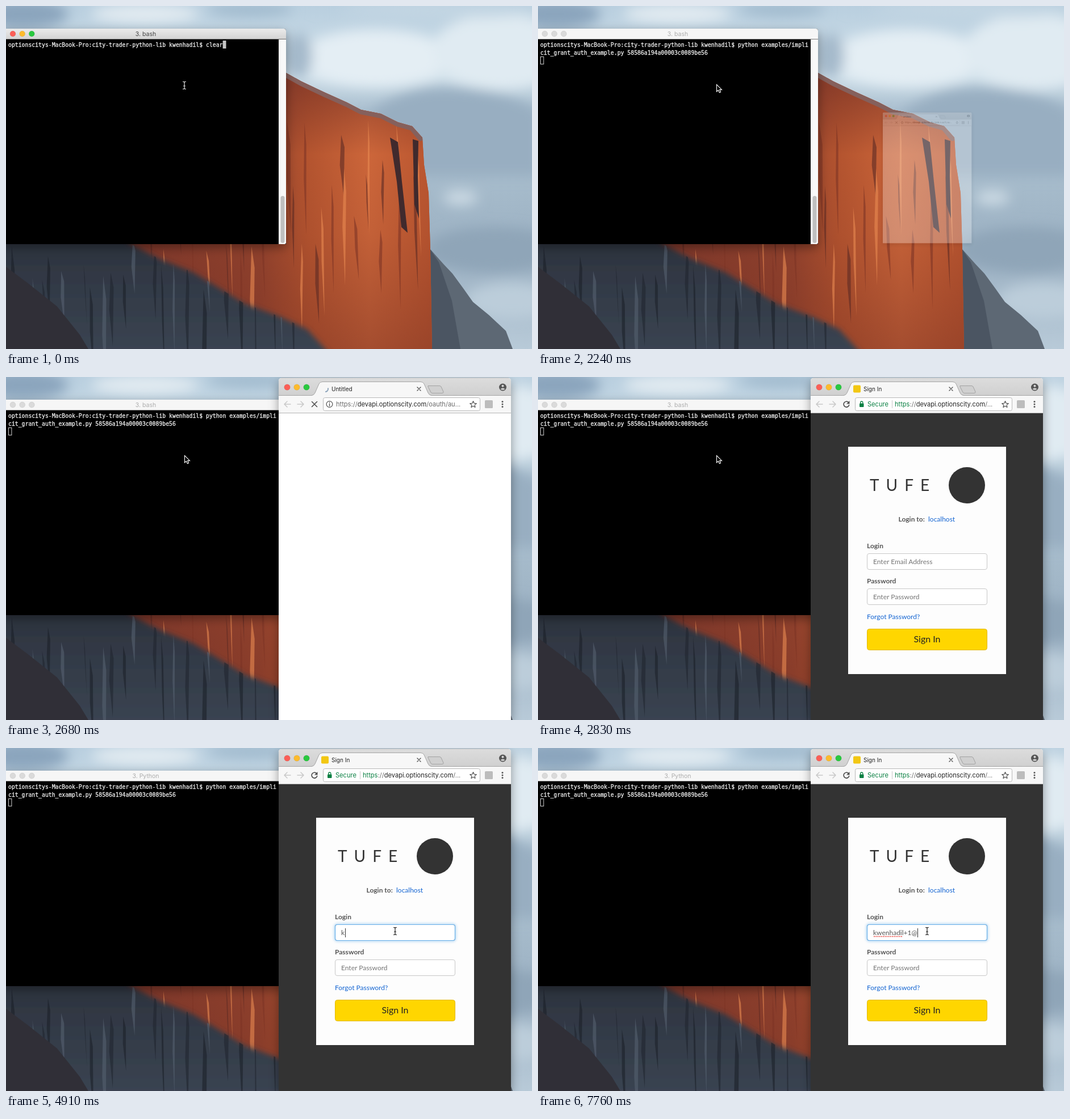
Animation, 926 px wide and 605 px high, one loop 8 s. Source, as an HTML page:

```html
<!DOCTYPE html>
<html lang="en">
<head>
<meta charset="utf-8">
<title>Terminal sign in</title>
<style>
  html, body { margin: 0; width: 100%; height: 100%; overflow: hidden; background: #b4c6d6; }
  svg { display: block; width: 926px; height: 605px; }
  text { white-space: pre; }
  .mono { font: 9.8px "DejaVu Sans Mono", monospace; fill: #ececec; stroke: #ececec; stroke-width: .32px; }
  .ui { font: 11.1px Inter, sans-serif; fill: #6b6b6b; }
  .page { font: 12px Lato, sans-serif; fill: #555; }
  .bold { font-weight: 700; }
  .link { fill: #1465d2; }
  .hint { fill: #757575; }
  .line { fill: none; stroke-linecap: round; stroke-linejoin: round; }
  #beam { mix-blend-mode: difference; }
</style>
</head>
<body>
<svg viewBox="0 0 926 605">
  <defs>
    <linearGradient id="sky" x2="0" y2="1">
      <stop offset="0" stop-color="#b9cfdf"/>
      <stop offset=".2" stop-color="#d0e0ea"/>
      <stop offset=".3" stop-color="#abc0d0"/>
      <stop offset=".52" stop-color="#a6bbcb"/>
      <stop offset=".72" stop-color="#9bb0c2"/>
      <stop offset="1" stop-color="#b8cad8"/>
    </linearGradient>
    <linearGradient id="sun">
      <stop offset="0" stop-color="#7c372b"/>
      <stop offset=".45" stop-color="#93432e"/>
      <stop offset=".6" stop-color="#b4542f"/>
      <stop offset=".8" stop-color="#cc663a"/>
      <stop offset="1" stop-color="#b9552f"/>
    </linearGradient>
    <linearGradient id="dusk" x2="0" y2="1">
      <stop offset=".08" stop-color="#6e2d25" stop-opacity=".55"/>
      <stop offset=".32" stop-color="#6e2d25" stop-opacity="0"/>
      <stop offset=".6" stop-color="#742f22" stop-opacity=".1"/>
      <stop offset="1" stop-color="#742f22" stop-opacity=".45"/>
    </linearGradient>
    <linearGradient id="shade" x2="0" y2="1">
      <stop offset="0" stop-color="#2b313c"/>
      <stop offset="1" stop-color="#3b4553"/>
    </linearGradient>
    <linearGradient id="bar" x2="0" y2="1">
      <stop offset="0" stop-color="#ebebeb"/>
      <stop offset="1" stop-color="#d3d3d3"/>
    </linearGradient>
    <linearGradient id="strip" x2="0" y2="1">
      <stop offset="0" stop-color="#dcdcdc"/>
      <stop offset="1" stop-color="#d0d0d0"/>
    </linearGradient>
    <filter id="soft" x="-50%" y="-50%" width="200%" height="200%"><feGaussianBlur stdDeviation="11"/></filter>
    <filter id="edge"><feGaussianBlur stdDeviation="5"/></filter>
    <filter id="drop" x="-20%" y="-20%" width="140%" height="140%">
      <feDropShadow dx="0" dy="6" stdDeviation="9" flood-opacity=".38"/>
    </filter>
    <filter id="glow" x="-10%" y="-40%" width="120%" height="180%"><feGaussianBlur stdDeviation="2"/></filter>
    <clipPath id="sunClip"><use href="#sunFace"/></clipPath>
    <clipPath id="shadeClip"><use href="#shadeFace"/></clipPath>
  </defs>

  <!-- wallpaper -->
  <rect width="926" height="605" fill="url(#sky)"/>
  <g filter="url(#soft)">
    <ellipse cx="30" cy="14" rx="80" ry="26" fill="#8ba5bd"/>
    <ellipse cx="245" cy="14" rx="95" ry="17" fill="#e2ebf1"/>
    <ellipse cx="430" cy="6" rx="75" ry="14" fill="#a3bccf"/>
    <ellipse cx="650" cy="92" rx="135" ry="50" fill="#e4eef4"/>
    <ellipse cx="870" cy="80" rx="120" ry="66" fill="#e0ebf2"/>
    <ellipse cx="770" cy="8" rx="180" ry="14" fill="#c3d6e3"/>
    <ellipse cx="515" cy="88" rx="24" ry="40" fill="#a4b9cb"/>
    <path d="M640 190Q700 140 790 145T940 185V300H700Z" fill="#98aec1"/>
    <ellipse cx="800" cy="338" rx="30" ry="13" fill="#ccdae4"/>
    <ellipse cx="860" cy="430" rx="120" ry="40" fill="#8fa5b8"/>
    <ellipse cx="890" cy="520" rx="80" ry="32" fill="#bccdda"/>
  </g>
  <path d="M746 428L770 455 786 472 805 498 822 522 850 545 880 573 892 605H745Z" fill="#5d6874"/>
  <path d="M746 428L762 452 785 520 800 605H745Z" fill="#4b5562"/>
  <path id="sunFace" d="M200 100H480L493 118 520 133 560 152 600 170 625 183 660 190 690 205 715 212 733 232 736 280 744 330 747 430 750 605H200Z" fill="url(#sun)"/>
  <use href="#sunFace" style="fill:url(#dusk)"/>
  <g clip-path="url(#sunClip)">
    <path d="M200 100H750V605H200Z" fill="url(#dusk)"/>
    <g id="sunStreaks"></g>
    <path d="M676 232L690 240 697 310 707 400 696 390 688 310ZM716 235L726 238 725 300 727 375 719 350Z" fill="#402a2d"/>
    <path d="M493 120L520 135 560 154 600 172 625 185 660 192 690 207 715 214 730 232" class="line" stroke="#85605c" stroke-width="12"/>
  </g>
  <path id="shadeFace" d="M-20 395H190L222 421 270 446 330 470 420 525 480 547 530 570 580 625H-20Z" fill="url(#shade)" filter="url(#edge)"/>
  <g id="shadeStreaks" clip-path="url(#shadeClip)"></g>
  <path d="M0 460L40 490 90 530 130 580 145 605H0Z" fill="#302f37"/>

  <!-- terminal -->
  <g>
    <path d="M-9 40H489Q493 40 493 44V420H-9Z" filter="url(#drop)"/>
    <path id="titleBar" d="M-9 58.500V40H489Q493 40 493 44V58.500Z"/>
    <g id="lights"></g>
    <text id="title" class="ui" x="246" y="53" text-anchor="middle" style="font-size:10.5px"></text>
    <path d="M480 59H493V417Q493 420 490 420H480Z" fill="#f8f8f8"/>
    <rect x="483.500" y="335" width="7" height="83" rx="3.500" fill="#bfbfbf"/>
    <text id="row1" class="mono" x="4" y="72"></text>
    <text id="row2" class="mono" x="4" y="86"></text>
    <rect id="cursor" height="14"/>
  </g>

  <!-- browser -->
  <g id="browser">
    <path d="M480 605V7Q480 2 485 2H884Q889 2 889 7V605Z" fill="#fff" filter="url(#drop)"/>
    <path d="M480 33V7Q480 2 485 2H884Q889 2 889 7V33Z" fill="url(#strip)"/>
    <path d="M484 1.500H885" stroke="#b9bcc0"/>
    <g id="tabLights"></g>
    <path d="M480 33H538Q542 32.500 544 28L551 12Q553 8.500 557 8.500H730Q734 8.500 736 12L743 28Q745 32.500 749 33H889V63H480Z" fill="#f7f7f7"/>
    <path d="M480 32.500H538Q542 32 544 28L551 12Q553 8.500 557 8.500H730Q734 8.500 736 12L743 28Q745 32 749 32.500H889" class="line" stroke="#a6a6a6"/>
    <path d="M743 15.500H763Q765 15.500 766 17L770 26Q770.500 28.500 768 28.500H751Q749 28.500 748 27L743 17Z" fill="#d0d0d0" stroke="#a2a2a2"/>
    <path d="M724 18L730 24M730 18L724 24" class="line" stroke="#555" stroke-width="1.400"/>
    <circle cx="874.500" cy="18" r="6.500" fill="#555"/>
    <circle cx="874.500" cy="15.800" r="2" fill="#d8d8d8"/>
    <path d="M870.500 21.300Q874.500 17.500 878.500 21.300Q874.500 24.300 870.500 21.300Z" fill="#d8d8d8"/>
    <path d="M480 63.500H889" stroke="#b4b4b4"/>
    <path d="M501 48H490M495 43L490 48 495 53M513 48H524M519 43L524 48 519 53" class="line" stroke="#c9c9c9" stroke-width="1.500"/>
    <rect x="558.500" y="36.500" width="276" height="23" rx="3" fill="#fff" stroke="#b8b8b8"/>
    <path d="M822.500 42.500L824.100 46.300 828.200 46.700 825.100 49.400 826 53.500 822.500 51.300 819 53.500 819.900 49.400 816.800 46.700 820.900 46.300Z" class="line" stroke="#555" stroke-width="1.200"/>
    <rect x="843" y="41" width="14" height="14" rx="1.500" fill="#bcbcbc"/>
    <g fill="#555"><circle cx="874" cy="43.500" r="1.500"/><circle cx="874" cy="48" r="1.500"/><circle cx="874" cy="52.500" r="1.500"/></g>
    <text id="tabName" class="ui" x="573" y="24.500" style="font-size:10px;fill:#222"></text>

    <path id="spinner" d="M562 16A5 5 0 0 1 567 21" class="line" stroke="#8ba3ba" stroke-width="2"/>
    <rect id="favicon" x="555" y="14.500" width="13" height="13" rx="2" fill="#f2c713"/>
    <path id="stop" d="M538.500 43.500L547.500 52.500M547.500 43.500L538.500 52.500" class="line" stroke="#505050" stroke-width="1.600"/>
    <g id="reload">
      <path d="M546.500 44.700A4.900 4.900 0 1 0 547.700 49.500" class="line" stroke="#505050" stroke-width="1.700"/>
      <path d="M548.500 42V47.500H543Z" fill="#505050"/>
    </g>
    <g id="plainUrl">
      <circle cx="569.500" cy="48" r="5.400" fill="none" stroke="#505050" stroke-width="1.200"/>
      <path d="M569.500 47.500V51M569.500 45V45.500" class="line" stroke="#505050" stroke-width="1.300"/>
      <text class="ui" x="581" y="52">https://<tspan fill="#222">devapi.optionscity.com</tspan>/oauth/au...</text>
    </g>
    <g id="secureUrl">
      <rect x="566" y="46.500" width="7.500" height="6.500" rx="1" fill="#0b8043"/>
      <path d="M567.700 47V45Q567.700 43 569.750 43T571.800 45V47" class="line" stroke="#0b8043" stroke-width="1.300"/>
      <text class="ui" x="580" y="52" style="fill:#0b8043">Secure</text>
      <path d="M623.500 41V55" stroke="#c8c8c8"/>
      <text class="ui" x="628" y="52"><tspan fill="#0b8043">https</tspan>://<tspan fill="#222">devapi.optionscity.com</tspan>/...</text>
    </g>

    <g id="form">
      <rect x="480" y="64" width="409" height="541" fill="#333"/>
      <rect x="546" y="123" width="278" height="401" fill="#fdfdfd"/>
      <text class="page" x="584" y="201" style="font-size:28px;letter-spacing:12px;fill:#333">TUFE</text>
      <circle cx="755" cy="191" r="32" fill="#333"/>
      <text class="page bold" x="634.500" y="255">Login to:</text>
      <text class="page link" x="687" y="255">localhost</text>
      <text class="page bold" x="579" y="302">Login</text>
      <rect id="halo" x="579.500" y="311.500" width="211" height="28" rx="4" fill="none" stroke="#66afe9" stroke-width="4" filter="url(#glow)"/>
      <rect x="579.500" y="311.500" width="211" height="28" rx="3.500" fill="#fff" stroke="#c8c8c8"/>
      <rect id="ring" x="579.500" y="311.500" width="211" height="28" rx="3.500" fill="none" stroke="#66afe9" stroke-width="1.200"/>
      <text id="hint" class="page hint" x="590" y="329.500">Enter Email Address</text>
      <text id="login" class="page" x="590" y="329.500"></text>
      <path id="spell" d="M591 332.500H642" stroke="#e5413b" stroke-width="1.600" stroke-dasharray="2 1.200"/>
      <rect id="caret" y="318" width="1" height="16" fill="#333"/>
      <text class="page bold" x="579" y="364">Password</text>
      <rect x="579.500" y="373.500" width="211" height="28" rx="3.500" fill="#fff" stroke="#c8c8c8"/>
      <text class="page hint" x="590" y="392">Enter Password</text>
      <text class="page link" x="579" y="426.500">Forgot Password?</text>
      <rect x="579.500" y="444.500" width="211" height="37" rx="4" fill="#ffd600" stroke="#e3b800"/>
      <text class="page" x="685" y="468" text-anchor="middle" style="font-size:16px;fill:#222">Sign In</text>
    </g>
  </g>

  <!-- pointers, hot spot at 0,0 -->
  <path id="arrow" d="M0 0V12.500L2.900 9.900 4.900 14.300 7.100 13.300 5.200 9.100H9Z" fill="#000" stroke="#fff" stroke-width="1.100"/>
  <path id="beam" class="line" d="M-2.500 -6.500Q0 -6.500 0 -5V5Q0 6.500 -2.500 6.500M2.500 -6.500Q0 -6.500 0 -5M0 5Q0 6.500 2.500 6.500M-1.500 1H1.500" stroke="#e0e0e0" stroke-width="1.200"/>
</svg>
<script>
const LOOP = 8000;
const COL = 5.9;
const USER = 'kwenhadil';
const PROMPT = `optionscitys-MacBook-Pro:city-trader-python-lib ${USER}$ `;
const COMMAND = 'python examples/implicit_grant_auth_example.py 58586a194a00003c0089be56';
const POP = 0.382;

// Each step changes only the listed parts of the state.
const STEPS = [
  [0, { command: 'clear', cursor: [64, 0], active: true, title: '3. bash', pointer: ['beam', 314, 140],
        win: 'none', page: 'blank', spin: 0, focus: 0, typed: 0, caret: false, spell: false }],
  [900, { command: COMMAND, cursor: [50, 1] }],
  [1950, { cursor: [0, 2] }],
  [2240, { active: false, pointer: ['arrow', 314.5, 138.5], win: 'pop' }],
  [2390, { win: 'full' }],
  [2540, { spin: 80 }],
  [2690, { page: 'loading', spin: 160 }],
  [2830, { page: 'ready' }],
  [3430, { title: '3. Python', pointer: ['arrow', 334, 147] }],
  [3580, { pointer: ['arrow', 452, 202] }],
  [3730, { pointer: ['arrow', 622, 288] }],
  [3870, { pointer: ['beam', 685, 323] }],
  [4020, { focus: 0.6, caret: true }],
  [4170, { focus: 1 }],
  [4470, { caret: false }],
  [4770, { typed: 1, caret: true }],
  [4920, { typed: 2 }],
  [5060, { typed: 4 }],
  [5210, { typed: 5 }],
  [5360, { typed: 7 }],
  [5960, { typed: 8 }],
  [6110, { typed: 9 }],
  [6560, { typed: 10, spell: true }],
  [7010, { typed: 11 }],
  [7460, { caret: false }],
  [7760, { typed: 12, caret: true }]
];

const $ = id => document.getElementById(id);
const set = (id, attrs) => {
  for (const key in attrs) $(id).setAttribute(key, attrs[key]);
};
const show = (id, on) => set(id, { display: on ? 'inline' : 'none' });

function random(seed) {
  return () => (seed = (seed * 16807) % 2147483647) / 2147483647;
}

// Long tapering cracks in the rock.
function streaks(id, seed, count, [left, right], [top, bottom], colors) {
  const rnd = random(seed);
  let html = '';
  for (let i = 0; i < count; i++) {
    const x = left + (right - left) * (i + rnd()) / count;
    const y = top + (bottom - top) * rnd();
    const h = 90 + 140 * rnd(), w = 2 + 4 * rnd(), lean = 6 * rnd() - 2;
    html += `<path d="M${x} ${y}l${w} ${h * .2} ${lean} ${h * .8} ${-w - 1} ${-h * .5}Z" fill="${colors[i % colors.length]}" opacity=".6"/>`;
  }
  $(id).innerHTML = html;
}

function drawLights(id, xs, y, r, colors) {
  $(id).innerHTML = xs.map((x, i) =>
    `<circle cx="${x}" cy="${y}" r="${r}" fill="${colors[i % colors.length]}" stroke="#000" stroke-opacity=".12" stroke-width=".6"/>`).join('');
}

const LIGHTS = ['#fb5f57', '#fdbb2d', '#2ac840'];
streaks('sunStreaks', 41, 36, [250, 745], [150, 450], ['#5c2a23', '#e98a52', '#7d3526']);
streaks('shadeStreaks', 17, 24, [10, 520], [400, 500], ['#1c2129', '#566171', '#20262f']);
drawLights('tabLights', [495, 512, 529], 18, 5.3, LIGHTS);

function stateAt(t) {
  return Object.assign({}, ...STEPS.filter(([time]) => time <= t).map(([, change]) => change));
}

function drawTerminal(s) {
  const line = PROMPT + s.command;
  const [col, row] = s.cursor;
  set('titleBar', { fill: s.active ? 'url(#bar)' : '#f6f6f6' });
  drawLights('lights', [12, 28.7, 45.3], 49, 5, s.active ? LIGHTS : ['#dadada']);
  $('title').textContent = s.title;
  $('title').style.fill = s.active ? '#444' : '#adadad';
  $('row1').textContent = line.slice(0, 80);
  $('row2').textContent = line.slice(80);
  const inset = s.active ? 0 : 0.5;
  set('cursor', {
    x: 4 + col * COL + inset, y: 61 + row * 14 + inset,
    width: COL - inset, height: 14 - 2 * inset,
    fill: s.active ? '#c4c4c4' : 'none', stroke: s.active ? 'none' : '#d0d0d0'
  });
}

function drawBrowser(s) {
  const ready = s.page === 'ready', painted = s.page !== 'blank', small = s.win === 'pop';
  show('browser', s.win !== 'none');
  set('browser', {
    opacity: small ? 0.28 : 1,
    transform: small ? `translate(${607 - 480 * POP} ${188 - 2 * POP}) scale(${POP})` : ''
  });
  $('tabName').textContent = painted ? 'Sign In' : 'Untitled';
  set('spinner', { transform: `rotate(${s.spin} 562 21)` });
  show('spinner', !ready);
  show('stop', !ready);
  show('favicon', ready);
  show('reload', ready);
  show('plainUrl', !painted);
  show('secureUrl', painted);
  show('form', painted);
}

function drawField(s) {
  const text = (USER + '+1@').slice(0, s.typed);
  set('halo', { opacity: s.focus * 0.5 });
  set('ring', { opacity: s.focus });
  $('login').textContent = text;
  show('hint', !text);
  show('spell', s.spell);
  show('caret', s.caret);
  const width = text ? $('login').getComputedTextLength() : 0;
  set('caret', { x: Math.round(590.6 + width) });
}

function drawPointer([kind, x, y]) {
  for (const id of ['arrow', 'beam']) show(id, id === kind);
  set(kind, { transform: `translate(${x} ${y})` });
}

let shown = -1;
function frame(now) {
  const t = now % LOOP;
  const step = STEPS.filter(([time]) => time <= t).length;
  if (step !== shown) {
    const s = stateAt(t);
    drawTerminal(s);
    drawBrowser(s);
    drawField(s);
    drawPointer(s.pointer);
    shown = step;
  }
  requestAnimationFrame(frame);
}
frame(performance.now());
</script>
</body>
</html>
```
